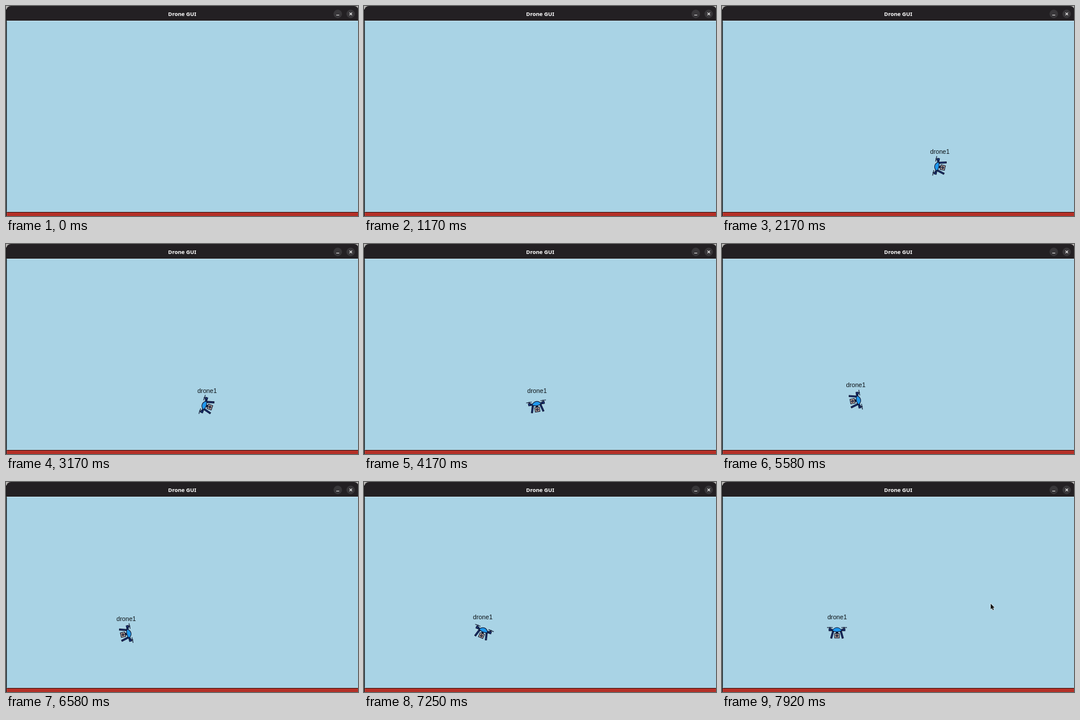
An HTML page with a canvas that plays this animation: 600x358 px, repeating every 8000 ms.

```html
<!DOCTYPE html>
<html lang="en">
<head>
<meta charset="utf-8">
<title>Drone GUI</title>
<style>
html, body { margin: 0; width: 100%; height: 100%; overflow: hidden; background: #a9d3e5; }
canvas { display: block; }
</style>
</head>
<body>
<canvas id="stage" width="600" height="358"></canvas>
<script>
const ctx = document.getElementById('stage').getContext('2d');
const LOOP = 8000, STEP = 1000 / 12;
const APPEAR = 1820, START = 2167, POINTER = 7800;
const INK = '#0b0f2a', NAVY = '#1b3a86', BLUE = '#1f97ec', TAN = '#c9b5a5', PALE = '#c3dfea';

// Sine ease from 0 to 1 between two times
function ease(t, from, to) {
  const u = Math.min(1, Math.max(0, (t - from) / (to - from)));
  return (1 - Math.cos(Math.PI * u)) / 2;
}

// Tilts left, speeds up, swings over to brake, then levels out
function pose(t) {
  t = Math.max(t, START);
  return {
    x: 374.5 - 171 * ease(t, 1700, 6850) - 7.5 * ease(t, 7000, 7900),
    y: 274 + 3.5 * ease(t, 2200, 4000) - 21 * ease(t, 3700, 7400),
    tilt: -78 + 160 * ease(t, 2750, 5850) - 82 * ease(t, 6400, 7700)
  };
}

function rect(color, x, y, w, h) {
  ctx.fillStyle = color;
  ctx.fillRect(x, y, w, h);
}

function line(color, width, x1, y1, x2, y2) {
  ctx.strokeStyle = color;
  ctx.lineWidth = width;
  ctx.beginPath();
  ctx.moveTo(x1, y1);
  ctx.lineTo(x2, y2);
  ctx.stroke();
}

function disc(color, x, y, r) {
  ctx.fillStyle = color;
  ctx.beginPath();
  ctx.arc(x, y, r, 0, 7);
  ctx.fill();
}

function text(str, font, color, x, y) {
  ctx.font = font;
  ctx.fillStyle = color;
  ctx.textAlign = 'center';
  ctx.fillText(str, x, y);
}

function drawWindow() {
  rect('#a9d3e5', 0, 0, 600, 358);
  rect('#111', 0, 0, 1.3, 358);
  rect('#b9b7b5', 0, 0, 600, 6);
  ctx.fillStyle = '#232023';
  ctx.beginPath();
  ctx.roundRect(0.5, 0, 600, 25, [8, 7, 0, 0]);
  ctx.fill();
  rect(PALE, 1.3, 25, 599, 1);
  text('Drone GUI', 'bold 9.3px "Noto Sans", "Open Sans", sans-serif', '#fff', 300.3, 17);
  for (const x of [565.5, 587.5]) disc('#39373a', x, 13.5, 7.2);
  line('#e8e8e8', 1, 563, 15.5, 568, 15.5);
  for (const s of [-2.2, 2.2]) line('#f4f4f4', 1.2, 587.7 - s, 11.3, 587.7 + s, 15.7);
  rect(PALE, 1.3, 350, 599, 1);
  rect('#2a1a1c', 1.3, 351, 599, 1);
  rect('#b53027', 1.3, 352, 599, 6);
}

function drawDrone({ x, y, tilt }) {
  text('drone1', '10.7px "Liberation Sans", Arial, sans-serif', '#0c1216', x + 0.3, y - 22.3);
  ctx.save();
  ctx.translate(x, y + 0.3);
  ctx.rotate(tilt * Math.PI / 180);
  for (const side of [-1, 1]) {
    ctx.save();
    ctx.scale(side, 1);
    line(INK, 1.1, 7.5, -8.7, 17, -8.7);
    line(INK, 1.4, 12, -9.6, 12, -6);
    line(INK, 3.6, 5, -3.5, 11, -5);
    line(NAVY, 1.4, 5, -3.5, 11, -5);
    rect(INK, 9.8, -7.2, 4.4, 4.6);
    rect(NAVY, 10.8, -6.2, 2.4, 2.6);
    line(INK, 3.4, 6.5, -2.5, 10, 10);
    line(NAVY, 1.2, 6.8, -1.5, 9.7, 9);
    ctx.restore();
  }
  ctx.fillStyle = BLUE;
  ctx.strokeStyle = INK;
  ctx.lineWidth = 1;
  ctx.beginPath();
  ctx.moveTo(-8, -3.2);
  ctx.bezierCurveTo(-4, -10.5, 4, -10.5, 8, -3.2);
  ctx.quadraticCurveTo(0, 0.6, -8, -3.2);
  ctx.fill();
  ctx.stroke();
  rect(INK, -2, -1, 4, 2.5);
  rect(INK, -4.5, 1, 9, 8.6);
  rect(TAN, -3.4, 2.1, 6.8, 6.4);
  disc(INK, 0, 5.3, 2.3);
  disc('#8d8f9c', 0, 5.3, 0.9);
  ctx.restore();
}

function drawPointer(x, y) {
  const arrow = new Path2D(`M${x} ${y}v9.5l2.2 -1.9 1.6 3.4 1.5 -.8 -1.5 -3.2 2.8 -.3z`);
  ctx.strokeStyle = '#e6f0f4';
  ctx.lineWidth = 1.2;
  ctx.stroke(arrow);
  ctx.fillStyle = '#161616';
  ctx.fill(arrow);
}

function frame(now) {
  const t = Math.floor((now % LOOP + 4) / STEP) * STEP;
  drawWindow();
  if (t > APPEAR) drawDrone(pose(t));
  if (t > POINTER) drawPointer(458, 207.5);
  requestAnimationFrame(frame);
}
requestAnimationFrame(frame);
</script>
</body>
</html>
```
